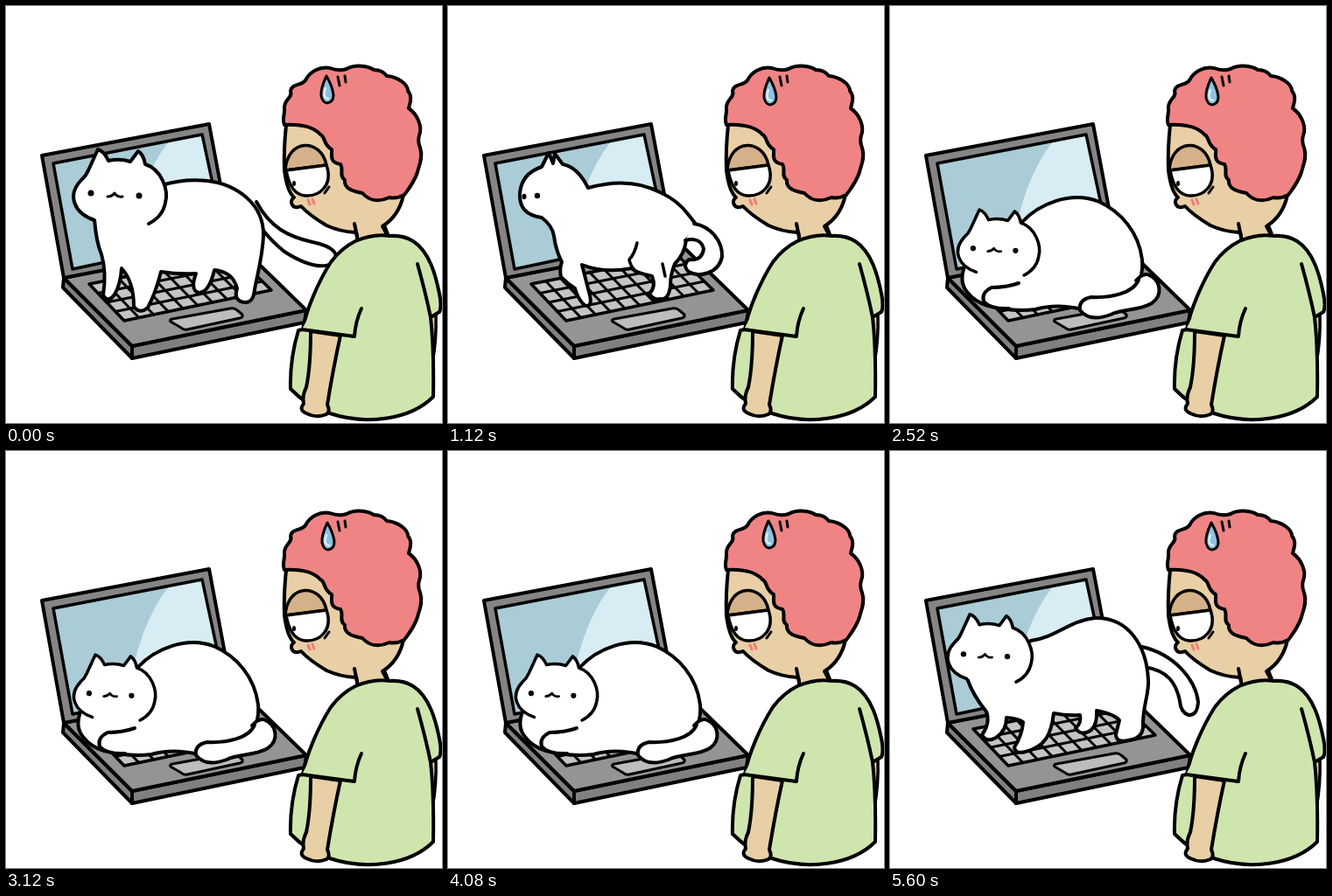
These frames come from a looping animation (498x477 px, 5.64 s). An HTML page with a canvas:

```html
<!DOCTYPE html>
<html lang="en">
<head>
<meta charset="utf-8">
<title>Cat on a laptop</title>
<style>
html, body { margin: 0; width: 100%; height: 100%; overflow: hidden; background: #fff; }
canvas { display: block; }
</style>
</head>
<body>
<canvas id="stage" width="498" height="477"></canvas>
<script>
const ctx = document.getElementById('stage').getContext('2d');
const LOOP = 5640, CEL = 100, LAST = 55, MIRROR = 382;

function draw(d, fill, width = 4, line = '#000') {
  const path = new Path2D(d);
  if (fill) { ctx.fillStyle = fill; ctx.fill(path); }
  if (width) { ctx.lineWidth = width; ctx.strokeStyle = line; ctx.stroke(path); }
}

function dot(x, y, rx, ry = rx) {
  ctx.beginPath();
  ctx.ellipse(x, y, rx, ry, 0, 0, 7);
  ctx.fillStyle = '#000';
  ctx.fill();
}

// ---- laptop ----
const mix = (a, b, t) => a + (b - a) * t;
const KEYS = [[95, 318], [262, 285], [303, 325], [135, 360]];
const ROWS = 4, COLS = 10;
function keyPoint(u, v) {
  const [a, b, c, d] = KEYS;
  return [0, 1].map(i => mix(mix(a[i], b[i], u), mix(d[i], c[i], u), v));
}
const keyLine = (u1, v1, u2, v2) => `M${keyPoint(u1, v1)}L${keyPoint(u2, v2)}`;

function laptop() {
  draw('M66 311L144 389L144 403L65 322Z', '#808080');
  draw('M144 389L343 348L341 362L144 403Z', '#808080');
  draw('M66 311L264 271L343 348L144 389Z', '#949494');
  draw('M41 171L232 135L258 274L66 311Z', '#858585');
  draw('M54 180L224 147L249 264L76 301Z', '#a9ccd6', 0);
  draw('M186 155L224 147L249 264L138 288Q150 200 186 155Z', '#d7ecf3', 0);
  draw('M54 180L224 147L249 264L76 301Z', null, 3.5);
  draw(`M${KEYS.join('L')}Z`, '#c4c4c4', 3.5);
  let grid = '';
  for (let row = 1; row < ROWS; row++) grid += keyLine(0, row / ROWS, 1, row / ROWS);
  for (let col = 1; col < COLS; col++) grid += keyLine(col / COLS, 0, col / COLS, 1);
  draw(grid, null, 3);
  draw('M190 358L256 346Q261 345 264 348L270 353Q271 356 267 357L207 370Q203 371 200 368L188 361Q186 359 190 358Z', '#bdbdbd', 3);
}

// ---- person ----
function person(odd) {
  const skin = '#e8cfa5', shirt = '#cfe5ae';
  draw('M484 355L491 352Q492 382 487 408Z', skin, 3.5);
  draw('M398 246L402 270L438 266L430 246Z', skin);
  draw('M320 136Q317 165 318 188Q322 213 334 226Q345 239 366 251Q381 258 398 260L430 252Q449 239 453 215L400 140Z', skin, 0);
  draw('M329 219C323 222 326 234 337 229Z', skin, 0);
  draw('M320 136Q317 165 318 188Q321 212 329 219C323 222 326 234 337 229Q346 239 366 251Q381 258 399 259M398 249L402 269M454 216Q449 240 430 252L437 265');

  draw('M318 136C315 129 319 122 318 117C317 107 328 105 325 97C327 88 337 92 342 85C347 75 358 69 370 71Q380 75 389 72C400 66 414 69 420 73Q430 73 435 80C447 81 459 89 459 97C465 104 461 112 460 117C470 124 476 138 472 148Q470 155 473 162C477 174 471 184 470 190C466 202 460 209 455 216Q446 221 438 219C425 225 414 222 407 214C396 212 386 209 387 199C380 195 386 187 382 181C368 179 373 169 372 164C362 159 365 149 359 147C352 139 338 135 318 136Z', '#f08484');

  draw('M319 188C321 151 360 151 366 182Z', '#d5b189', 3.5);
  draw('M320 188L366 182C374 205 358 218 342 217Q325 216 320 188Z', '#fff', 3.5);
  dot(329, 203, 2, 3);
  draw('M364 214L369 207', null, 3);
  draw('M345 222L347 227M350 221L352 226', null, 3, '#f07c78');

  ctx.save();
  if (odd) ctx.translate(1, 2);
  draw('M366 80Q359 95 360 103Q362 111 367 111Q374 110 374 102Q373 92 366 80Z', '#8fc0df', 3);
  draw('M365 94Q361 105 368 106', null, 2.5, '#d7ecf6');
  ctx.restore();
  draw('M379 81L381 91M387 80L388 87', null, 3);

  draw('M399 269Q420 260 438 263Q454 262 465 269C484 281 491 309 495 329Q498 344 495 350L485 356Q489 392 488 447C462 473 412 480 370 466Q343 457 325 438Q324 404 334 371L339 370C343 347 357 315 371 293Q383 277 399 269Z', shirt);
  draw('M348 372Q348 412 343 436Q338 446 340 455Q334 462 343 466Q355 472 366 467Q371 464 367 456Q374 413 382 377Z', skin);
  draw('M338 370L398 378L406 346L375 300Z', shirt, 0);
  draw('M338 370L398 378Q399 361 406 346M470 295Q479 327 485 356');
}

// ---- cat parts ----
const BODY = {
  stand: 'M101 244Q103 270 109 284Q115 304 111 331Q117 340 124 330Q131 318 132 300Q146 315 146 344Q153 353 162 345Q171 328 177 304Q195 307 217 306Q210 325 220 328Q232 328 238 302Q259 304 264 323Q260 334 268 338Q280 342 283 330C286 310 293 289 294 263C295 226 263 204 230 200Q204 197 178 205Z',
  step: 'M88 260Q95 280 110 298Q115 311 105 325Q110 334 121 328Q133 320 133 305Q147 306 152 310Q151 325 142 339Q143 347 155 344C177 338 184 325 187 300Q202 303 217 302Q219 311 212 317Q218 327 230 319Q237 312 236 297Q256 301 262 308L258 324Q258 334 272 331Q288 329 289 316C288 293 296 279 295 262C293 222 272 190 234 191C205 194 190 213 161 217Z',
  away: 'M107 184L115 168L120 180L122 169L131 181Q148 184 160 208C188 200 217 200 242 213Q262 222 274 238L285 252L272 268Q270 284 259 295Q254 307 254 320Q252 337 242 335Q235 337 230 329Q238 321 233 309Q214 305 210 300Q178 306 153 296L162 331Q165 344 157 343Q149 337 145 323Q137 318 129 310Q127 301 130 293Q123 279 121 263Q119 251 107 242C88 239 82 230 82 216Q83 192 107 184Z',
  front: 'M150 235C130 250 130 290 142 318L144 338Q152 347 162 338L166 316Q186 320 206 316L210 338Q220 347 230 338L234 318C246 290 250 250 230 235Z',
  loaf: 'M86 296Q78 315 88 327Q96 338 112 343Q140 350 166 347Q190 340 220 347L276 330Q290 312 288 290C284 258 263 235 239 224C207 211 170 226 150 248Z'
};
const TAIL = {
  long: 'M286 224C302 254 323 264 350 270C374 275 382 284 374 294C360 302 340 295 318 281Q303 269 290 252',
  hook: 'M288 224C326 233 349 262 352 287Q351 303 341 302Q332 299 331 286C327 266 318 251 290 247',
  curl: 'M281 249C300 252 314 269 313 287C309 306 287 311 275 304Q267 297 275 290Q290 292 292 278Q289 264 271 268',
  wrap: 'M281 314Q288 306 294 307C310 313 312 331 299 340C284 349 266 346 252 353Q228 362 217 348Q215 336 230 333C251 334 278 329 284 313',
  back: 'M188 262C202 282 207 302 222 308Q236 306 233 320C215 331 194 309 181 271'
};
const HEAD = 'M-29 38C-52 30 -61 10 -44 -8Q-39 -12 -36 -19L-25 -43Q-18 -41 -13 -30Q0 -33 12 -29L21 -41Q27 -37 29 -26C48 -20 56 4 52 18Q49 34 33 42';

function head({ x, y, size = 1, face = 0 }) {
  ctx.save();
  ctx.translate(x, y);
  ctx.scale(size, size);
  draw(HEAD, '#fff');
  if (face !== null) {
    ctx.translate(face, 0);
    dot(-33, 7, 3.5);
    dot(22, 10, 3.5);
    draw('M-14 11Q-9 11 -6 7Q-3 12 3 11', null, 3);
  }
  ctx.restore();
}

// ---- cat poses ----
const stand = { body: 'stand', tail: 'long', head: { x: 130, y: 207 } };
const step = { body: 'step', tail: 'hook', head: { x: 114, y: 226, size: .91 } };
const away = { body: 'away', tail: 'curl', over: true };
const front = { body: 'front', head: { x: 186, y: 214 } };
const back = { body: 'front', tail: 'back', over: true, behind: true, head: { x: 190, y: 216, face: null } };
const loaf = { body: 'loaf', tail: 'wrap', over: true, head: { x: 124, y: 271, size: .88 } };
const flip = pose => ({ ...pose, flip: true });

// One full turn on the spot, one pose per cel, before settling down.
const TURN = [
  stand,
  { ...stand, head: { x: 154, y: 205, face: 5 } },
  front,
  { ...front, head: { x: 203, y: 212, face: 10 } },
  flip(stand.tail && { ...stand, tail: 'hook' }),
  flip(step),
  flip({ ...step, head: { ...step.head, y: 220, face: -8 } }),
  flip({ ...away, tail: 'hook', over: false }),
  flip(away),
  back,
  { ...back, head: { x: 172, y: 218, face: null } },
  away,
  { ...away, tail: 'hook', over: false },
  { ...step, head: { ...step.head, y: 220, face: -8 } },
  step,
  { ...step, squash: .88 }
];

function cat({ body, tail, head: top, over, behind, flip, squash = 1 }) {
  ctx.save();
  if (flip) { ctx.translate(MIRROR, 0); ctx.scale(-1, 1); }
  ctx.translate(0, 345 * (1 - squash));
  ctx.scale(1, squash);
  const drawTail = () => tail && draw(TAIL[tail], '#fff');
  if (!over) drawTail();
  if (behind) head(top);
  draw(BODY[body], '#fff');
  if (body === 'away') {
    dot(87, 218, 2.5, 3.2);
    dot(102, 217, 3.2);
    draw('M216 271Q213 284 207 290Q208 297 214 303M245 295L248 309', null, 3.5);
  }
  if (over) drawTail();
  if (top && !behind) head(top);
  if (body === 'loaf') draw('M147 317Q133 322 116 322Q104 328 107 338Q115 347 136 346', '#fff');
  ctx.restore();
}

function frame(now) {
  const cel = Math.max(0, Math.floor((now % LOOP - 20) / CEL));
  ctx.fillStyle = '#fff';
  ctx.fillRect(0, 0, 498, 477);
  ctx.lineCap = ctx.lineJoin = 'round';
  laptop();
  cat(cel >= LAST ? step : TURN[cel] || loaf);
  person(cel % 2);
  requestAnimationFrame(frame);
}
requestAnimationFrame(frame);
</script>
</body>
</html>
```
